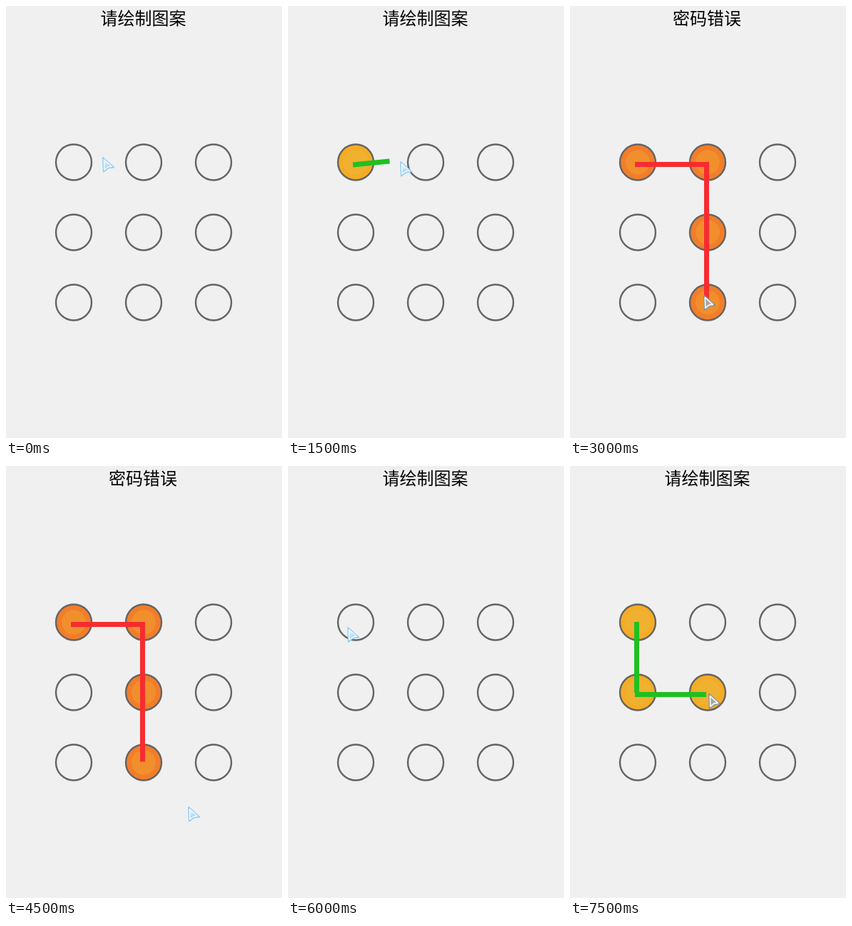
Write an HTML page that moves like this. It is 387x604 px and loops after 8000 ms.

```html
<!DOCTYPE html>
<html lang="zh-CN">
<head>
<meta charset="utf-8">
<title>图案解锁</title>
<style>
html, body { margin: 0; width: 100%; height: 100%; overflow: hidden; background: #f0f0f0; }
svg { display: block; width: 387px; height: 604px; }
text { font: 24px "Noto Sans CJK SC", "Noto Sans CJK", sans-serif; text-anchor: middle; }
.rings { fill: none; stroke: #646464; stroke-width: 2.4; }
.line { fill: none; stroke: #20c020; stroke-width: 7; }
.wrong .line { stroke: #f82c30; }

/* Every change is a hard step; one step is 6.25% (500 ms). */
.show, #pointer, #gray { animation: 8s step-end infinite; }
.show, #gray { opacity: 0; }

#prompt { animation-name: prompt; }
@keyframes prompt { 0% { opacity: 1; } 37.5% { opacity: 0; } 62.5%, 100% { opacity: 1; } }
.wrong { animation-name: wrong; }
@keyframes wrong { 0% { opacity: 0; } 37.5% { opacity: 1; } 62.5%, 100% { opacity: 0; } }

.first { animation-name: first; }
@keyframes first { 0% { opacity: 0; } 18.75% { opacity: 1; } 37.5%, 100% { opacity: 0; } }
.first-drag { animation-name: first-drag; }
@keyframes first-drag { 0% { opacity: 0; } 18.75% { opacity: 1; } 25%, 100% { opacity: 0; } }
.first-join { animation-name: first-join; }
@keyframes first-join { 0% { opacity: 0; } 25% { opacity: 1; } 37.5%, 100% { opacity: 0; } }

.second { animation-name: second; }
@keyframes second { 0% { opacity: 0; } 81.25%, 100% { opacity: 1; } }
.second-drag { animation-name: second-drag; }
@keyframes second-drag { 0% { opacity: 0; } 81.25% { opacity: 1; } 87.5%, 100% { opacity: 0; } }
.second-join { animation-name: second-join; }
@keyframes second-join { 0% { opacity: 0; } 87.5%, 100% { opacity: 1; } }
.third-drag { animation-name: third-drag; }
@keyframes third-drag { 0% { opacity: 0; } 87.5% { opacity: 1; } 93.75%, 100% { opacity: 0; } }
.third-join { animation-name: third-join; }
@keyframes third-join { 0% { opacity: 0; } 93.75%, 100% { opacity: 1; } }

#pointer { animation-name: move; }
@keyframes move {
  0% { transform: translate(135px, 211px); }
  6.25% { transform: translate(52px, 222px); }
  12.5% { transform: translate(90px, 218px); }
  18.75% { transform: translate(157px, 217px); }
  25% { transform: translate(188px, 377px); }
  31.25% { transform: translate(189px, 415px); }
  37.5% { transform: translate(187px, 404px); }
  43.75% { transform: translate(245px, 401px); }
  50% { transform: translate(262px, 490px); }
  56.25% { transform: translate(255px, 476px); }
  62.5% { transform: translate(264px, 437px); }
  68.75% { transform: translate(285px, 412px); }
  75% { transform: translate(83px, 225px); }
  81.25% { transform: translate(88px, 301px); }
  87.5% { transform: translate(157px, 314px); }
  93.75%, 100% { transform: translate(194px, 318px); }
}
#gray { animation-name: gray; }
@keyframes gray {
  0% { opacity: 0; } 37.5% { opacity: 1; } 43.75% { opacity: 0; } 93.75%, 100% { opacity: 1; }
}
</style>
</head>
<body>
<svg viewBox="0 0 387 604">
  <defs>
    <linearGradient id="ice" x1="0" y1="0" x2=".6" y2="1">
      <stop offset=".2" stop-color="#e4f2fb"/>
      <stop offset="1" stop-color="#8ecbf2"/>
    </linearGradient>
    <g id="ring-row">
      <circle cx="95" r="25"/><circle cx="193" r="25"/><circle cx="291" r="25"/>
    </g>
    <g id="gold"><circle r="25" fill="#f5ac25"/><circle r="18" fill="#f0b030"/></g>
    <g id="orange"><circle r="25" fill="#f27d2a"/><circle r="17" fill="#f18f2d"/></g>
    <path id="arrow" d="M1 1 L16.3 14.6 L8.7 15.3 L1.8 20.8 Z"/>
  </defs>
  <rect width="387" height="604" fill="#f0f0f0"/>

  <text id="prompt" class="show" x="192.5" y="25.5">请绘制图案</text>

  <use href="#gold" x="95" y="218.5" class="show first"/>
  <use href="#gold" x="193" y="218.5" class="show first-join"/>
  <use href="#gold" x="95" y="218.5" class="show second"/>
  <use href="#gold" x="95" y="316.5" class="show second-join"/>
  <use href="#gold" x="193" y="316.5" class="show third-join"/>
  <g class="show wrong">
    <text x="192" y="25.5">密码错误</text>
    <use href="#orange" x="95" y="218.5"/>
    <use href="#orange" x="193" y="218.5"/>
    <use href="#orange" x="193" y="316.5"/>
    <use href="#orange" x="193" y="414.5"/>
  </g>

  <g class="rings">
    <use href="#ring-row" y="218.5"/>
    <use href="#ring-row" y="316.5"/>
    <use href="#ring-row" y="414.5"/>
  </g>

  <path class="line show first-drag" d="M91 222 L142.5 217"/>
  <g class="show first-join">
    <path class="line" d="M91 221.5 H193"/>
    <path fill="#20c020" d="M190 218 H194 L197 222 L192 227 L188 224 Z"/>
  </g>
  <g class="show wrong"><path class="line" d="M91 221.5 H191.5 V413.5" stroke-linejoin="miter"/></g>
  <path class="line show second-drag" d="M94 218 L92 284"/>
  <path class="line show second-join" d="M93.5 218 V317"/>
  <path class="line show third-drag" d="M91 320 L142 315"/>
  <path class="line show third-join" d="M91 319.5 H191"/>

  <g id="pointer" stroke-linejoin="round">
    <use href="#arrow" fill="url(#ice)" stroke="#8fcdf3" stroke-width="1.8"/>
    <path d="M2.3 3.4 L13.4 13.5 L8.1 14 L2.8 18.2 Z" fill="url(#ice)" stroke="#f8fcff" stroke-width="1.3"/>
    <g id="gray">
      <use href="#arrow" fill="#a5a5a2" stroke="#8b8d8d" stroke-width="2"/>
      <path d="M2.3 3.4 L13.4 13.5 L8.1 14 L2.8 18.2 Z" fill="#a4a6a4" stroke="#f4f4f2" stroke-width="1.8"/>
    </g>
  </g>
</svg>
</body>
</html>
```
